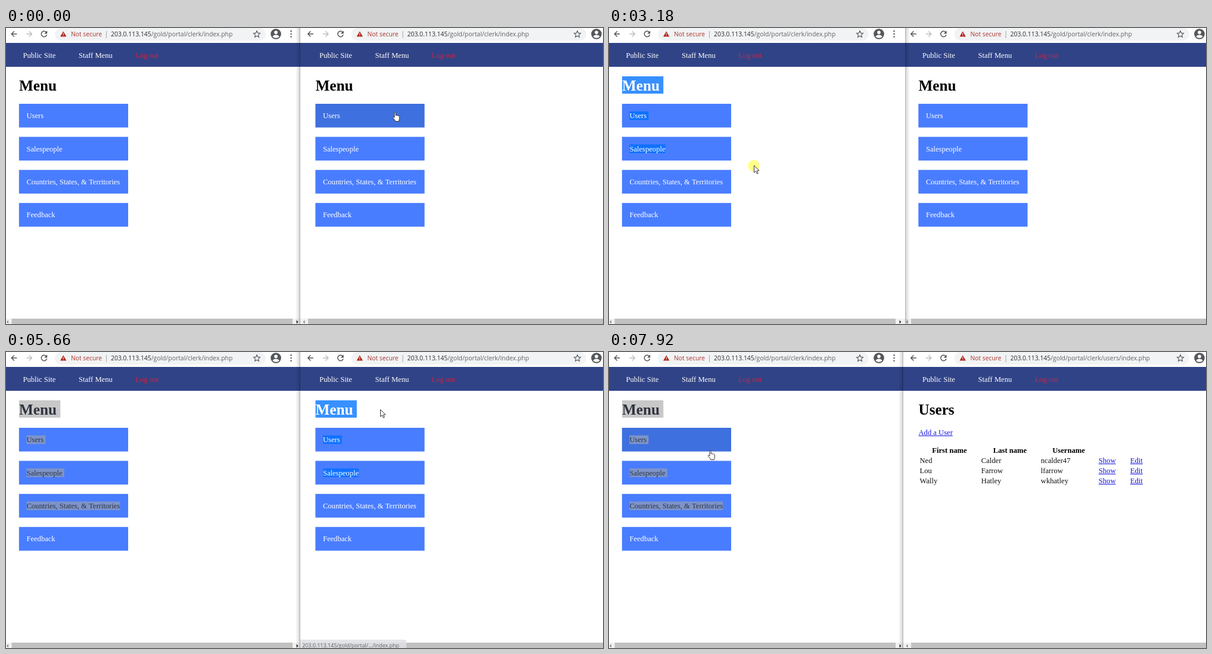
These frames come from a looping animation (1002x496 px, 7.99 s). An HTML page with a canvas:

```html
<!DOCTYPE html>
<html lang="en">
<head>
<meta charset="utf-8">
<title>Two browser windows</title>
<style>
  html, body { margin: 0; height: 100%; overflow: hidden; background: #fff; }
  canvas { display: block; }
</style>
</head>
<body>
<canvas id="stage" width="1002" height="496"></canvas>
<script>
const c = document.getElementById('stage').getContext('2d');
const LOOP = 7990, TICK = 1000 / 15;
const SERIF = '"Liberation Serif", serif', SANS = '"Open Sans", sans-serif';
const BODY = '12.6px ' + SERIF, BOLD = 'bold 12.6px ' + SERIF, TITLE = 'bold 25.2px ' + SERIF;
const ADDRESS = '10.4px ' + SANS, STATUS = '8.95px ' + SANS;
const HOST = '203.0.113.145', FOLDER = '/gold/portal/';
const BUTTONS = ['Users', 'Salespeople', 'Countries, States, & Territories', 'Feedback'];
const PEOPLE = [
  ['Ned', 'Calder', 'ncalder47'],
  ['Lou', 'Farrow', 'lfarrow'],
  ['Wally', 'Hatley', 'wkhatley']
];
const RIGHT = 497.5;

// Pointer path: tick, x, y, shape from that tick on
const PATH = [
  [0, 653, 141, 'arrow'], [14, 653, 141, 'arrow'], [15, 640, 141, 'arrow'], [20, 470, 146, 'arrow'],
  [21, 457, 143, 'arrow'], [22, 473, 138, 'arrow'], [25, 292, 62, 'arrow'], [28, 292, 62, 'arrow'],
  [40, 39, 99, 'beam'], [44, 39, 99, 'beam'], [45, 30, 99, 'beam'], [46, 27, 99, 'beam'],
  [47, 27, 99, 'beam'], [48, 243, 230, 'arrow'], [50, 258, 260, 'arrow'], [51, 330, 215, 'arrow'],
  [54, 522, 88, 'beam'], [55, 522, 88, 'beam'], [56, 526, 88, 'beam'], [59, 520, 88, 'beam'],
  [65, 520, 88, 'none'], [69, 590, 132, 'none'], [76, 625, 190, 'none'], [78, 625, 190, 'arrow'],
  [82, 638, 79, 'arrow'], [85, 628, 96, 'arrow'], [91, 605, 120, 'arrow'], [92, 605, 120, 'arrow'],
  [93, 604, 130, 'hand'], [104, 604, 130, 'hand'], [105, 598, 136, 'arrow'], [111, 304, 177, 'arrow'],
  [113, 304, 177, 'arrow'], [119, 170, 165, 'hand'], [121, 170, 165, 'hand']
];
const within = (t, from, to) => t >= from && t < to;

function pointerAt(t) {
  const i = PATH.findIndex((key, n) => n + 1 === PATH.length || PATH[n + 1][0] > t);
  const a = PATH[i], b = PATH[i + 1] || a;
  const p = b === a ? 0 : (t - a[0]) / (b[0] - a[0]);
  return { x: a[1] + (b[1] - a[1]) * p, y: a[2] + (b[2] - a[2]) * p, shape: a[3] };
}

function rect(x, y, w, h, color) {
  c.fillStyle = color;
  c.fillRect(x, y, w, h);
}

function text(s, x, y, font, color, align = 'left') {
  c.font = font;
  c.fillStyle = color;
  c.textAlign = align;
  c.fillText(s, x, y);
  return c.measureText(s).width;
}

function shape(d, fill, stroke, width = 1) {
  const path = new Path2D(d);
  if (fill) { c.fillStyle = fill; c.fill(path); }
  if (stroke) { c.strokeStyle = stroke; c.lineWidth = width; c.stroke(path); }
}

function disc(x, y, r, color) {
  c.fillStyle = color;
  c.beginPath();
  c.arc(x, y, r, 0, 7);
  c.fill();
}

function toolbar(extra, path, loading) {
  const ink = '#505357';
  rect(-4, 0, 520, 25, '#fff');
  shape('M18.3 10H9.5M13.8 5.4L9.2 10l4.6 4.6', null, ink, 1.4);
  shape('M34.3 10h8.8M38.8 5.4l4.6 4.6l-4.6 4.6', null, '#bcbec1', 1.4);
  if (loading) {
    shape('M60 6l8 8M68 6l-8 8', null, ink, 1.4);
  } else {
    shape('M67.6 7A4.7 4.7 0 1 0 68.5 11.3', null, ink, 1.4);
    shape('M69.2 4.6v5h-5z', ink);
  }
  c.fillStyle = '#f1f3f4';
  c.beginPath();
  c.roundRect(82, 0, 354 + extra, 21, 10.5);
  c.fill();
  shape('M96.2 5.4l5.2 9h-10.4z', '#b3281f');
  rect(95.7, 8.4, 1, 3, '#fff');
  rect(95.7, 12.2, 1, 1, '#fff');
  text('Not secure', 109, 14, '10.3px ' + SANS, '#a8352f');
  rect(168, 5, 1, 12, '#a4a7aa');
  const w = text(HOST, 176, 14, ADDRESS, '#2b2d30');
  text(path, 176 + w, 14, ADDRESS, '#606468');
  c.save();
  c.translate(extra, 0);
  shape('M421 4.8l1.6 3.6l3.9.4l-2.9 2.6l.8 3.9l-3.4-2l-3.4 2l.8-3.9l-2.9-2.6l3.9-.4z', null, ink, 1.1);
  disc(453, 10, 8.8, '#54575b');
  disc(453, 7.4, 2.8, '#fff');
  shape('M447.5 14.6c1-4 10-4 11 0c-2.5 3-8.5 3-11 0z', '#fff');
  for (const y of [5.2, 10, 14.8]) disc(478.5, y, 1.2, ink);
  c.restore();
}

function selectable(s, x, y, font, state) {
  const { selected, more, active, dark, color } = state;
  if (selected) {
    const big = font === TITLE;
    c.font = font;
    const w = c.measureText(s).width + (more ? (big ? 6.3 : 3.2) : 0);
    const fill = active ? (dark ? '#1072ff' : '#3890ff') : (dark ? '#7d94c9' : '#c8c8c8');
    rect(x, y - (big ? 24 : 11.5), w, big ? 29 : 14.5, fill);
  }
  text(s, x, y, font, selected ? (active ? '#fff' : '#2f3340') : color);
}

function menu(level, active, hover) {
  selectable('Menu', 22, 105, TITLE,
    { selected: level > 0, more: level > 1, active, color: '#000' });
  BUTTONS.forEach((label, i) => {
    const y = 127 + i * 55.4;
    rect(21.8, y, 183.2, 39.7, hover === i ? '#3e70df' : '#497dff');
    selectable(label, 34.4, y + 24.2, BODY,
      { selected: level > i + 1, more: level > i + 2, active, dark: true, color: '#fff' });
  });
}

function link(s, x, y) {
  const w = text(s, x, y, BODY, '#1414e0');
  rect(x, Math.round(y + 1), w, 1, '#1414e0');
}

function userList() {
  text('Users', 22, 105, TITLE, '#000');
  link('Add a User', 22, 138.5);
  [['First name', 74], ['Last name', 175.5], ['Username', 274]]
    .forEach(([s, x]) => text(s, x, 169, BOLD, '#000', 'center'));
  PEOPLE.forEach((row, i) => {
    const y = 186 + i * 17;
    row.forEach((s, n) => text(s, [24, 127.3, 227.3][n], y, BODY, '#111'));
    link('Show', 324.3, y);
    link('Edit', 377.3, y);
  });
}

function browser(x, from, to, extra, page) {
  c.save();
  c.beginPath();
  c.rect(from, 0, to - from, 496);
  c.clip();
  c.translate(x, 0);
  rect(-4, 0, 520, 496, '#fff');
  toolbar(extra, page.path, page.loading);
  rect(-4, 25, 520, 40, '#304387');
  text('Public Site', 28.5, 50, BODY, '#fff');
  text('Staff Menu', 122, 50, BODY, '#fff');
  text('Log out', 217, 50, BODY, '#cf2340');
  if (page.list) userList();
  else menu(page.level, page.active, page.hover);
  rect(-4, 487, 520, 9, '#f1f1f1');
  rect(9.5, 487, 471.5 + extra, 9, '#c1c1c1');
  shape('M4 489.5v6l-3-3z', '#8b8b8b');
  if (!extra) shape('M487.5 489.5v6l3-3z', '#333');
  c.restore();
}

function edgeShadow(edge, direction) {
  const end = edge + 8 * direction;
  const g = c.createLinearGradient(edge, 0, end, 0);
  g.addColorStop(0, 'rgba(0,0,0,.3)');
  g.addColorStop(.3, 'rgba(0,0,0,.12)');
  g.addColorStop(1, 'rgba(0,0,0,0)');
  rect(Math.min(edge, end), 0, 8, 496, g);
}

function statusBubble(t) {
  const full = within(t, 15, 24);
  let alpha = 0;
  if (within(t, 15, 22) || within(t, 76, 85) || within(t, 93, 106)) alpha = 1;
  else if (within(t, 22, 30)) alpha = .6;
  else if (t === 85) alpha = .85;
  if (!alpha) return;
  c.save();
  c.globalAlpha = alpha;
  c.fillStyle = '#dee1e6';
  c.beginPath();
  c.roundRect(494, 482, full ? 241 : 178, 16, [0, 4, 0, 0]);
  c.fill();
  const address = full ? 'https://' + HOST + FOLDER + 'clerk/users/index.php' : HOST + FOLDER + '.../index.php';
  text(address, 497, 494.6, STATUS, '#4c4f54');
  c.restore();
}

function drawPointer({ x, y }, kind) {
  c.save();
  c.translate(x, y);
  c.lineJoin = 'round';
  if (kind === 'arrow') {
    shape('M.5.5v11.8l2.8-2.6l2 4.6l2-.9l-2-4.4h3.7z', '#fff', '#222', .9);
  } else if (kind === 'beam') {
    shape('M-3-7.5h2.2l.8.8l.8-.8h2.2M0-6.7v13.4M-3 7.5h2.2l.8-.8l.8.8h2.2', null, '#333');
  } else if (kind === 'hand') {
    shape('M-1 1.2c0-1.6 2.2-1.6 2.2 0v4.4c.4-.9 2.1-.7 2.2.4c.5-.8 2-.5 2.1.5c.6-.6 1.9-.2 1.9 1v3.4' +
      'c0 1.8-1 2.4-1 4.6h-5.6c-.3-2-3.5-4.4-4.3-6.3c-.5-1.3 1-2 1.9-.9l.6.9z', '#fff', '#222', .9);
  }
  c.restore();
}

function buttonUnder({ x, y }, left) {
  if (!within(x, left + 22, left + 205)) return -1;
  return BUTTONS.findIndex((_, i) => within(y - 127 - i * 55.4, 0, 39.7));
}

function draw(time) {
  const t = Math.floor(time / TICK + .35);
  const pointer = pointerAt(t);
  const pressed = within(t, 46, 51) || within(t, 63, 78) || within(t, 94, 98);
  const leftActive = within(t, 48, 63);
  const list = t >= 102;
  const hoverLeft = buttonUnder(pointer, 0);
  const hoverRight = list ? -1 : buttonUnder(pointer, RIGHT);
  const edge = leftActive ? 497 : 494;

  browser(0, 0, edge, 0, {
    path: FOLDER + 'clerk/index.php',
    level: t < 48 ? 0 : t < 50 ? 3 : 4, active: leftActive, hover: hoverLeft
  });
  browser(RIGHT, edge, 1002, 40.5, {
    path: FOLDER + (list ? 'clerk/users/index.php' : 'clerk/index.php'),
    loading: within(t, 98, 102), list,
    level: t < 66 ? 0 : t < 69 ? 1 : t < 73 ? 2 : 3, active: true, hover: hoverRight
  });
  edgeShadow(edge, leftActive ? 1 : -1);
  statusBubble(t);

  if (pressed) disc(pointer.x, pointer.y + .7, 9.8, 'rgba(255,255,25,.52)');
  const overButton = hoverLeft >= 0 || hoverRight >= 0;
  drawPointer(pointer, overButton && !pressed ? 'hand' : pointer.shape);
}

function loop() {
  draw(performance.now() % LOOP);
  requestAnimationFrame(loop);
}
loop();
</script>
</body>
</html>
```
